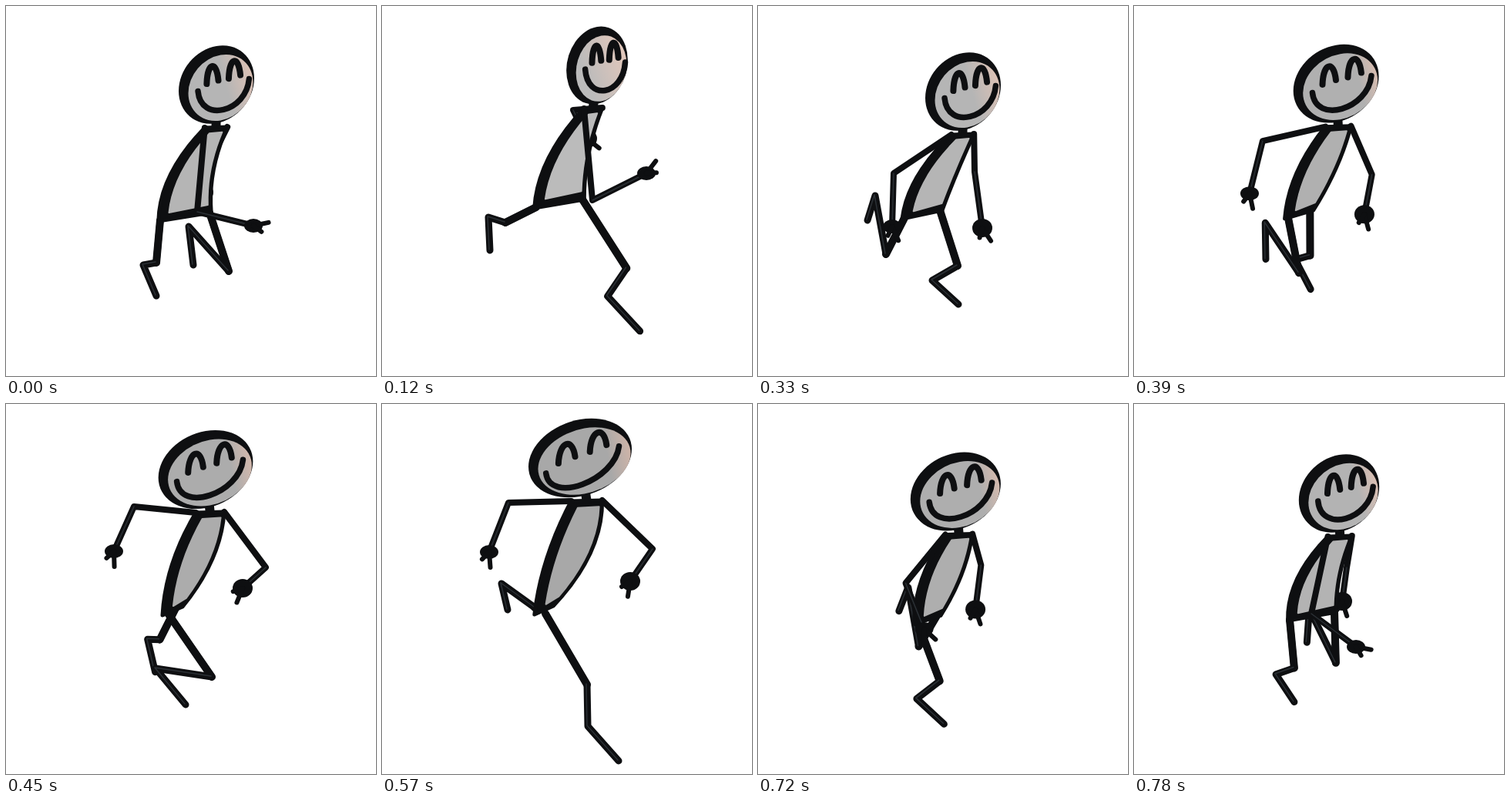
Animation, 480 px wide and 480 px high, one loop 0.81 s. Source, as an HTML page with a canvas:

```html
<!DOCTYPE html>
<html lang="en">
<head>
<meta charset="utf-8">
<title>Running stick figure</title>
<style>
html, body { margin: 0; width: 100%; height: 100%; overflow: hidden; background: #fff; }
canvas { display: block; width: 480px; height: 480px; }
</style>
</head>
<body>
<canvas id="stage" width="480" height="480"></canvas>
<script>
const ctx = document.getElementById('stage').getContext('2d');
const LOOP = 810, STEP = 30, INK = '#0e0f11', SHEEN = '#2b3035';

// Key points: time in ms, then values.
// Body: head centre, hip centre, half distance between the legs.
const body = [
  [0, 273, 102, 232, 273, 32],
  [120, 279, 77, 230, 256, 30],
  [225, 273, 84, 224, 258, 26],
  [330, 266, 111, 213, 270, 23],
  [450, 259, 85, 216, 268, 5],
  [570, 257, 70, 210, 267, -2],
  [660, 250, 104, 210, 281, -2],
  [780, 266, 116, 231, 275, 29]];

// One stride, relative to the hip: knee, ankle, toe. Both legs share it.
const stride = [
  [0, 25, 76, -27, 18, -21, 68],
  [45, 56, 81, -17, 70, 22, 117],
  [165, 54, 92, 55, 146, 95, 191],
  [255, 46, 85, 41, 125, 78, 172],
  [330, 23, 72, -10, 91, 24, 122],
  [405, -5, 55, -22, 58, -5, 98],
  [525, -40, 20, -62, 13, -60, 56],
  [570, -10, 2, -53, -29, -45, 5],
  [660, -2, 13, -31, -56, -45, -24],
  [735, -24, 47, -38, -29, -48, 3]];

// Arms: elbow, hand.
const nearArm = [
  [0, 248, 267, 321, 285],
  [120, 273, 252, 343, 217],
  [330, 176, 217, 174, 286],
  [450, 166, 133, 140, 191],
  [570, 164, 128, 139, 192],
  [660, 161, 188, 155, 257],
  [780, 230, 272, 288, 315]];
const farArm = [
  [0, 263, 205, 256, 242],
  [120, 248, 135, 266, 172],
  [330, 281, 215, 291, 288],
  [450, 337, 212, 307, 239],
  [570, 351, 188, 322, 230],
  [660, 305, 203, 294, 268],
  [780, 276, 212, 270, 256]];

// Cyclic cubic interpolation through the key points.
function pose(track, t) {
  const n = track.length;
  const row = i => track[(i + n) % n];
  const time = i => row(i)[0] + Math.floor(i / n) * LOOP;
  let i = n - 1;
  while (track[i][0] > t) i--;
  const span = time(i + 1) - time(i), u = (t - time(i)) / span;
  const slope = (k, c) => (row(k + 1)[c] - row(k - 1)[c]) / (time(k + 1) - time(k - 1)) * span;
  return row(i).slice(1).map((a, k) => {
    const c = k + 1, b = row(i + 1)[c], p = slope(i, c), q = slope(i + 1, c);
    return a + u * (p + u * (3 * (b - a) - 2 * p - q + u * (2 * (a - b) + p + q)));
  });
}

function line(points, width, color = INK) {
  ctx.beginPath();
  for (let i = 0; i < points.length; i += 2) ctx.lineTo(points[i], points[i + 1]);
  ctx.lineWidth = width;
  ctx.strokeStyle = color;
  ctx.stroke();
}

function blob(x, y, rx, ry) {
  ctx.beginPath();
  ctx.ellipse(x, y, rx, ry, 0, 0, 2 * Math.PI);
  ctx.fillStyle = INK;
  ctx.fill();
}

function leg(x, y, t) {
  const joints = pose(stride, t % LOOP).map((v, i) => v + (i % 2 ? y : x));
  line([x, y, ...joints], 9);
  line([x, y, ...joints.slice(0, 2)], 10);
  line(joints.map(v => v - 1), 1.5, SHEEN);
}

function arm(shoulder, [ex, ey, x, y], rx, ry) {
  const angle = Math.atan2(y - ey, x - ex);
  const finger = (turn, length) =>
    line([x, y, x + length * Math.cos(angle + turn), y + length * Math.sin(angle + turn)], 6);
  line([...shoulder, ex, ey, x, y], 8);
  line([ex, ey, x, y], 1.5, SHEEN);
  blob(x, y, rx, ry);
  finger(-0.45, 20);
  finger(0.4, 13);
}

// Point on the curve from a to b, bowed sideways.
function bow(a, b, bend, u) {
  return [a[0] + (b[0] - a[0]) * u + 2 * u * (1 - u) * bend, a[1] + (b[1] - a[1]) * u];
}

// Fills the area between the back and front edges of the body.
function trunk(back, front, [from, to], inset, color, width) {
  ctx.beginPath();
  const count = 10;
  for (let i = 0; i <= 2 * count + 1; i++) {
    const down = i <= count;
    const u = from + (to - from) * (down ? i : 2 * count + 1 - i) / count;
    const [x, y] = bow(...(down ? back : front), u);
    ctx.lineTo(x + (down ? inset : -inset * 0.3), y);
  }
  ctx.closePath();
  ctx.fillStyle = ctx.strokeStyle = color;
  ctx.lineWidth = width;
  ctx.fill();
  ctx.stroke();
}

// Builds a path in unit coordinates on a sheared disc.
function onDisc(x, y, w, h, shear, build) {
  ctx.save();
  ctx.transform(w, -shear * w, 0, h, x, y);
  ctx.beginPath();
  build();
  ctx.restore();
}

const circle = () => ctx.arc(0, 0, 1, 0, 2 * Math.PI);

function drawHead(x, y, w, turn, light) {
  const h = 50, shear = 0.17;
  onDisc(x, y, w, h, shear, circle);
  ctx.fillStyle = INK;
  ctx.fill();

  x += 5.5;
  y += 4;
  const fw = w - 7, fh = h - 7.5, warm = Math.max(0, turn);
  const glow = ctx.createLinearGradient(x - fw, y + 12, x + fw, y - 12);
  glow.addColorStop(0, `rgb(${light},${light},${light})`);
  glow.addColorStop(0.75 - warm * 0.6, `rgb(${light},${light},${light})`);
  glow.addColorStop(1, `rgb(${light + 38},${light + 12},${light})`);
  onDisc(x, y, fw, fh, shear, circle);
  ctx.fillStyle = glow;
  ctx.fill();

  const shift = 0.06 + 0.1 * turn, tilt = 0.27 - 0.1 * turn;
  ctx.strokeStyle = INK;
  ctx.lineWidth = 8;
  for (const side of [-0.34, 0.34]) {
    const cx = shift + side;
    onDisc(x, y, fw, fh, tilt, () => {
      ctx.moveTo(cx - 0.18, -0.22);
      ctx.bezierCurveTo(cx - 0.16, -0.88, cx + 0.12, -0.88, cx + 0.18, -0.24);
    });
    ctx.stroke();
  }
  onDisc(x, y, fw, fh, tilt, () => {
    ctx.moveTo(shift - 0.79, -0.06);
    ctx.bezierCurveTo(shift - 0.7, 0.94, shift + 0.7, 0.94, shift + 0.79, -0.06);
  });
  ctx.lineWidth = 7.5;
  ctx.stroke();
}

function draw(now) {
  const t = Math.floor(now % LOOP / STEP) * STEP;
  const [headX, headY, hipX, hipY, spread] = pose(body, t);

  // The view swings once per loop and widens or narrows the figure.
  const turn = Math.cos((t - 165) / LOOP * 2 * Math.PI);
  const headW = 53 - 14 * turn, light = Math.round(178 + 10 * turn);

  const neckX = headX + (headW - 50) / 2, neckY = headY + 55;
  const half = headW * 0.3, pelvis = Math.hypot(spread, 12);
  const backTop = [neckX - half, neckY + 1], frontTop = [neckX + half, neckY];
  const back = [backTop, [hipX - pelvis, hipY + 6], -16 - 0.4 * spread];
  const front = [frontTop, [hipX + pelvis, hipY - 5], 30 - 1.4 * spread];

  ctx.fillStyle = '#fff';
  ctx.fillRect(0, 0, 480, 480);
  ctx.lineCap = ctx.lineJoin = 'round';
  leg(hipX + spread, hipY - 5, t);
  leg(hipX - spread, hipY + 5, t + LOOP / 2);
  arm(frontTop, pose(farArm, t), 13, 12);
  line([headX, headY, neckX, neckY], 12);
  trunk(back, front, [0, 1], 0, INK, 5);
  trunk(back, front, [0.06, 0.91], 13, `rgb(${light},${light},${light})`, 2);
  arm(backTop, pose(nearArm, t), 12, 9);
  drawHead(headX, headY, headW, turn, light);
  requestAnimationFrame(draw);
}
requestAnimationFrame(draw);
</script>
</body>
</html>
```
